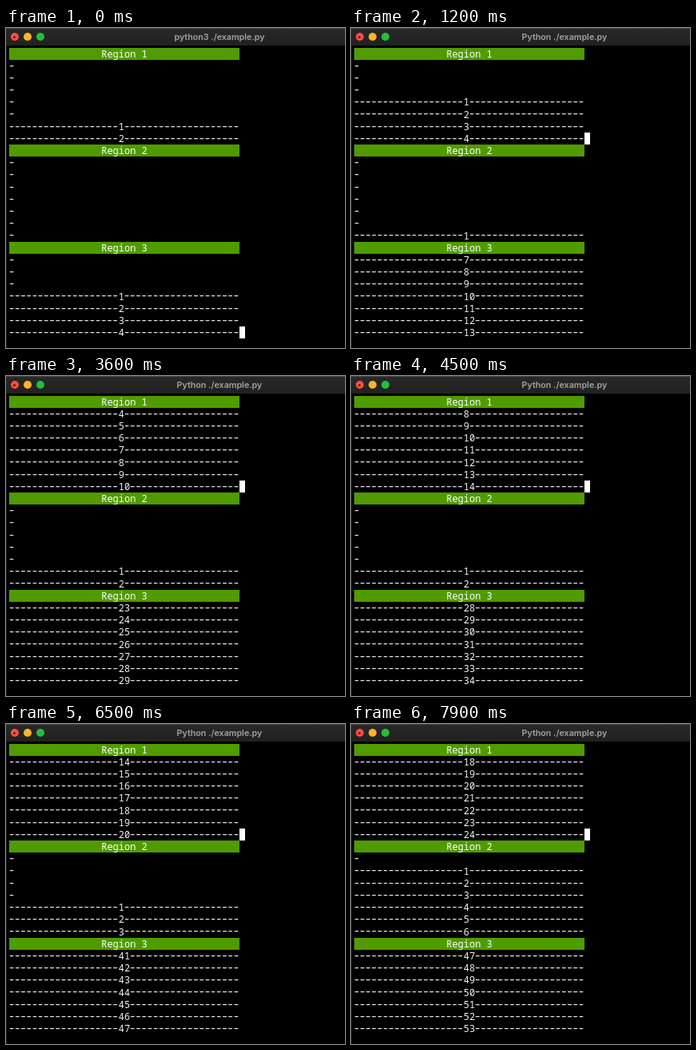
These frames come from a looping animation (424 by 401 pixels, 8 s). An HTML page:

```html
<!DOCTYPE html>
<html lang="en">
<head>
<meta charset="utf-8">
<title>Terminal regions</title>
<style>
  html, body { margin: 0; width: 100%; height: 100%; overflow: hidden; background: #000; }
  #stage {
    position: absolute; left: 0; top: 0; width: 424px; height: 401px; overflow: hidden;
    background: #000; box-shadow: inset 1px 0 #222;
  }
  #bar {
    position: absolute; left: 0; top: 0; width: 424px; height: 22px;
    background: linear-gradient(#292929, #212121); box-shadow: inset 0 1px #484848;
  }
  #title {
    position: absolute; left: 167px; width: 200px; top: .5px; text-align: center;
    font: 600 10.7px/22px Inter, "Liberation Sans", sans-serif; color: #a3a3a3; white-space: pre;
  }
  .light { position: absolute; top: 6px; width: 10.4px; height: 10.4px; border-radius: 50%; }
  .light.dot::after {
    content: ""; position: absolute; left: 3.7px; top: 3.7px; width: 3px; height: 3px;
    border-radius: 50%; background: #7a0d08;
  }
  .row {
    position: absolute; left: 4px; width: 288px; height: 15.2px; white-space: pre;
    font: 12px/15.2px "Noto Sans Mono", "DejaVu Sans Mono", monospace; color: #f4f4f4;
    font-variant-ligatures: none;
  }
  .head { background: #509b00; color: #fff; }
  .dash {
    position: relative; left: -.5px; top: -1.2px;
    color: #e2e2e2; text-shadow: .6px 0 currentColor, -.6px 0 currentColor;
  }
  #cursor { position: absolute; left: 292px; width: 7px; height: 15.2px; background: #fff; }
</style>
</head>
<body>
<div id="stage">
  <div id="bar">
    <div class="light dot" style="left:5.6px;background:#ff4b44"></div>
    <div class="light" style="left:21.6px;background:#fdb42a"></div>
    <div class="light" style="left:37.6px;background:#20c03c"></div>
    <div id="title"></div>
  </div>
  <div id="cursor"></div>
</div>
<script>
const LOOP = 8000, STEP = 100, TITLE_SWITCH = 400;
const COLS = 40, LINES = 7, ROW_H = 15.2, TOP = 24.6;
const START = [2, 0, 4];

// Region that receives the next line at each step; "." is a pause.
const WRITES =
  "333133233331" + "33313331333" + "3133123.31331" +
  "313313131" + "33133133233133133131" + "321313.2313231";

const stage = document.getElementById("stage");
const title = document.getElementById("title");
const cursor = document.getElementById("cursor");
const rowTop = i => TOP + i * ROW_H + "px";

function addRow(index, cls) {
  const row = document.createElement("div");
  row.className = "row " + cls;
  row.style.top = rowTop(index);
  return stage.appendChild(row);
}

function addSpan(row, cls) {
  const span = document.createElement("span");
  span.className = cls;
  return row.appendChild(span);
}

const regions = START.map((_, r) => {
  const first = r * (LINES + 1);
  addRow(first, "head").textContent = " ".repeat(16) + "Region " + (r + 1);
  return Array.from({ length: LINES }, (_, i) => {
    const row = addRow(first + 1 + i, "");
    return ["dash", "num", "dash"].map(cls => addSpan(row, cls));
  });
});

function setLine([left, num, right], value) {
  const text = value > 0 ? String(value) : "";
  const pad = Math.floor((COLS - text.length) / 2);
  left.textContent = "-".repeat(text ? pad : 1);
  num.textContent = text;
  right.textContent = text ? "-".repeat(COLS - pad - text.length) : "";
}

function show(step) {
  const counts = START.slice();
  let last = 2;
  for (const c of WRITES.slice(0, step)) {
    if (c === ".") continue;
    last = c - 1;
    counts[last]++;
  }
  regions.forEach((lines, r) =>
    lines.forEach((line, i) => setLine(line, counts[r] - LINES + 1 + i)));
  cursor.style.top = rowTop(last * (LINES + 1) + LINES);
  title.textContent = (step * STEP < TITLE_SWITCH ? "python3" : "Python") + " ./example.py";
}

let shown = -1;
const origin = performance.now();
function tick() {
  const step = Math.floor(((performance.now() - origin) % LOOP) / STEP);
  if (step !== shown) show(shown = step);
  requestAnimationFrame(tick);
}
tick();
</script>
</body>
</html>
```
